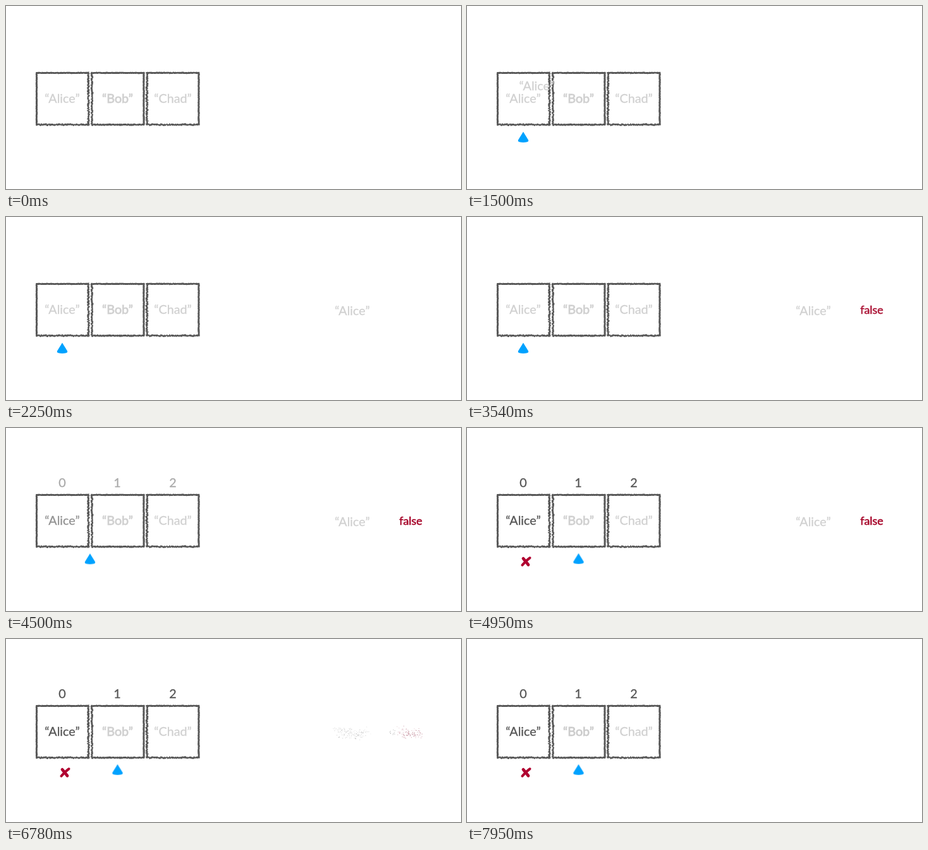
An HTML page for the animation above (8000 ms loop, 720 px wide and 291 px high).

```html
<!DOCTYPE html>
<html lang="en">
<head>
<meta charset="utf-8">
<title>Array search</title>
<style>
  html, body { margin: 0; width: 100%; height: 100%; overflow: hidden; background: #fff; }
  svg { position: absolute; left: 0; top: 0; width: 720px; height: 291px; }
  text {
    font: 19.8px Lato, "Open Sans", sans-serif;
    text-anchor: middle;
    color: #d0d0d0;
    fill: currentColor;
    stroke: currentColor;
    stroke-width: .3;
  }
  .anim, #dust rect { animation: 8s linear infinite; }

  #alice { animation-name: darken; }
  #bob { stroke-width: .8; animation-name: hint; }
  #index { animation-name: index; }
  #index text { color: #555; }
  #copy { animation-name: copy; }
  #flight {
    offset-path: path("M0 0C130 -134 329 -132 459 2");
    offset-rotate: 0deg;
    animation-name: fly;
  }
  #verdict { color: #a50026; font-size: 18px; stroke-width: .5; animation-name: verdict; }
  #pointer { fill: #00a2ff; animation-name: point; }
  #step { animation-name: step; }
  #cross { stroke: #b00030; fill: none; stroke-linecap: round; animation-name: cross; }
  #dust rect { animation-name: scatter; }

  @keyframes point { 0%, 14.25% { opacity: 0 } 18%, 100% { opacity: 1 } }
  @keyframes copy {
    0%, 16.87% { opacity: 0 }
    16.875%, 78.99% { opacity: 1 }
    79%, 100% { opacity: 0 }
  }
  @keyframes fly {
    0% { offset-distance: 0% }
    16.875% { offset-distance: 0%; animation-timing-function: ease-in-out }
    28.125%, 100% { offset-distance: 100% }
  }
  @keyframes verdict {
    0%, 34.5% { opacity: 0 }
    45%, 78.99% { opacity: 1 }
    79%, 100% { opacity: 0 }
  }
  @keyframes index { 0%, 50.625% { opacity: 0 } 61.875%, 100% { opacity: 1 } }
  @keyframes darken { 0%, 50.625% { color: #d0d0d0 } 61.875%, 100% { color: #555 } }
  @keyframes step {
    0% { transform: none }
    50.625% { transform: translate(0, 0); animation-timing-function: ease-in-out }
    61.875%, 100% { transform: translate(87.5px, -.8px) }
  }
  @keyframes cross { 0%, 56.25% { opacity: 0 } 61.875%, 100% { opacity: 1 } }
  @keyframes hint { 0%, 97.875% { color: #d0d0d0 } 100% { color: #cacaca } }
  @keyframes scatter {
    0%, 78.99% { opacity: 0; transform: translate(0, 0) }
    79% { opacity: var(--ink); transform: translate(0, 0) }
    89%, 100% { opacity: 0; transform: translate(var(--dx), var(--dy)) }
  }
</style>
</head>
<body>
<svg viewBox="0 0 720 291">
  <path id="boxes" fill="#585858"/>
  <text id="alice" class="anim" x="89" y="154">“Alice”</text>
  <text id="bob" class="anim" x="176.5" y="154">“Bob”</text>
  <text x="264" y="154">“Chad”</text>
  <g id="index" class="anim">
    <text x="89" y="94">0</text>
    <text x="176" y="94">1</text>
    <text x="264" y="94">2</text>
  </g>
  <g id="flight" class="anim">
    <text id="copy" class="anim" x="89" y="154">“Alice”</text>
  </g>
  <text id="verdict" class="anim" x="640.5" y="154">false</text>
  <g id="step" class="anim">
    <path id="pointer" class="anim" d="M89 200L97 213Q98 215.500 95 216.300Q89 217.500 83 216.300Q80 215.500 81 213Z"/>
  </g>
  <g id="cross" class="anim">
    <path stroke-width="4.800" d="M89 207.500Q92 211 97 217.500"/>
    <path stroke-width="4" d="M99.500 206.500Q93 211 87.500 218"/>
  </g>
  <g id="dust" shape-rendering="crispEdges"></g>
</svg>
<script>
  const randomFrom = seed => () => {
    seed = (seed * 16807) % 2147483647;
    return seed / 2147483647;
  };

  // Chalky box outlines; rough = [top, right, bottom, left]
  function drawBoxes() {
    const rand = randomFrom(71);
    let d = '';
    const rect = (x, y, w, h) => {
      d += `M${x.toFixed(1)} ${y.toFixed(1)}h${w.toFixed(1)}v${h.toFixed(1)}h${(-w).toFixed(1)}z`;
    };
    const edge = (x, y, length, vertical, rough) => {
      for (let i = 0; i < length; i += 1.5) {
        const thick = 3 + (rand() - .5) * rough;
        const off = (rand() - .5) * rough - thick / 2;
        if (vertical) rect(x + off, y + i, thick, 1.6);
        else rect(x + i, y + off, 1.6, thick);
      }
    };
    const box = (x, [top, right, bottom, left]) => {
      edge(x - 1, 106.4, 83, false, top);
      edge(x + 82, 105.5, 84, true, right);
      edge(x - 1, 188.7, 84, false, bottom);
      edge(x, 105.5, 84, true, left);
    };
    box(48.5, [.5, 1.7, 1.4, .4]);
    box(136, [.5, .5, 1, 1.6]);
    box(223, [.6, .5, 1.3, 1.7]);
    document.getElementById('boxes').setAttribute('d', d);
  }

  // About half the inked pixels of the result line become drifting grains
  function makeDust() {
    const W = 720, H = 291;
    const rand = randomFrom(913);
    const pad = document.createElement('canvas');
    pad.width = W;
    pad.height = H;
    const ctx = pad.getContext('2d', { willReadFrequently: true });
    const write = (text, x, y, size, color) => {
      ctx.font = `${size}px Lato, "Open Sans", sans-serif`;
      ctx.textAlign = 'center';
      ctx.fillStyle = color;
      ctx.fillText(text, x, y);
    };
    write('“Alice”', 548, 156, 19.8, '#888');
    write('false', 640.5, 154, 18, '#800828');
    ctx.fillStyle = '#555';
    ctx.fillRect(605, 147, 10, 2);

    const { data } = ctx.getImageData(0, 0, W, H);
    const dust = document.getElementById('dust');
    for (let i = 0; i < W * H; i++) {
      const [r, g, b, a] = data.subarray(i * 4, i * 4 + 4);
      if (a < 50 || rand() < .45) continue;
      const grain = document.createElementNS('http://www.w3.org/2000/svg', 'rect');
      const attrs = { x: i % W, y: Math.floor(i / W), width: 1, height: 1, fill: `rgb(${r},${g},${b})` };
      for (const name in attrs) grain.setAttribute(name, attrs[name]);
      grain.style.setProperty('--ink', (a / 255).toFixed(2));
      grain.style.setProperty('--dx', `${((rand() - .5) * 20).toFixed(1)}px`);
      grain.style.setProperty('--dy', `${((rand() - .4) * 14).toFixed(1)}px`);
      dust.append(grain);
    }
  }

  drawBoxes();
  makeDust();
</script>
</body>
</html>
```
